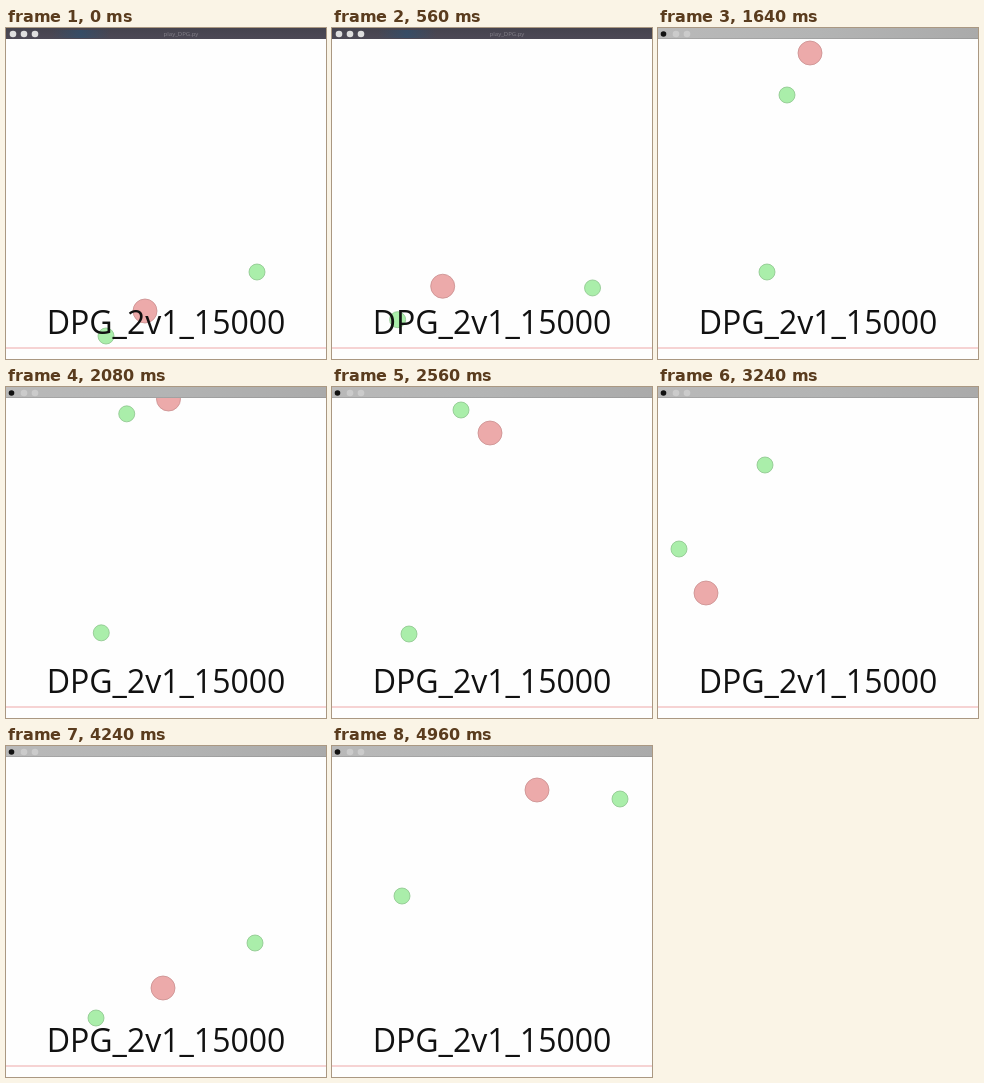
Recreate the animation shown at these times as an HTML page with a canvas. Size 320x331 px, loop 5 s.

```html
<!DOCTYPE html>
<html lang="en">
<head>
<meta charset="utf-8">
<title>DPG 2v1</title>
<style>
  html, body { margin: 0; width: 100%; height: 100%; overflow: hidden; background: #fefefe; }
  canvas { display: block; width: 320px; height: 331px; }
</style>
</head>
<body>
<canvas id="stage" width="320" height="331"></canvas>
<script>
const ctx = document.getElementById('stage').getContext('2d');
const LOOP = 5000;
const STEP = 40;
const BAR_SWITCH = 800;
const BAR_HEIGHT = 11;

// Each path point: [time in ms, x, y]
const agents = [
  { radius: 12, fill: '#ecaaaa', edge: '#c98f8f', path: [
    [0, 139, 283], [480, 108, 262], [1040, 151, 221], [1640, 152, 25], [2560, 158, 46],
    [3240, 48, 206], [4240, 157, 242], [4960, 205, 44]] },
  { radius: 8, fill: '#aaeeaa', edge: '#8cc58c', path: [
    [0, 100, 308], [400, 50, 286], [1040, 138, 313], [1640, 109, 244], [2560, 77, 247],
    [3240, 21, 162], [4240, 90, 272], [4960, 70, 150]] },
  { radius: 8, fill: '#aaeeaa', edge: '#8cc58c', path: [
    [0, 251, 244], [500, 260, 258], [1040, 253, 262], [1640, 129, 67], [2560, 129, 23],
    [3240, 107, 78], [4240, 249, 197], [4960, 288, 53]] }
];

const clamp = (v, lo, hi) => Math.min(hi, Math.max(lo, v));

function slope(path, i, axis) {
  const a = path[Math.max(0, i - 1)];
  const b = path[Math.min(path.length - 1, i + 1)];
  return (b[axis] - a[axis]) / (b[0] - a[0]);
}

// Cubic Hermite curve through unevenly timed points
function position(path, time, axis) {
  const t = Math.min(time, path[path.length - 1][0]);
  let i = 0;
  while (i < path.length - 2 && t > path[i + 1][0]) i++;
  const a = path[i], b = path[i + 1];
  const span = b[0] - a[0];
  const u = (t - a[0]) / span;
  const u2 = u * u, u3 = u2 * u;
  return (2 * u3 - 3 * u2 + 1) * a[axis] + (3 * u2 - 2 * u3) * b[axis] +
    (u3 - 2 * u2 + u) * span * slope(path, i, axis) +
    (u3 - u2) * span * slope(path, i + 1, axis);
}

function disc(x, y, radius, fill, edge) {
  ctx.beginPath();
  ctx.arc(x, y, radius, 0, Math.PI * 2);
  ctx.fillStyle = fill;
  ctx.fill();
  if (edge) {
    ctx.strokeStyle = edge;
    ctx.lineWidth = 0.8;
    ctx.stroke();
  }
}

function label(text, x, y, size, color) {
  ctx.font = `${size}px "Open Sans", "Noto Sans", sans-serif`;
  ctx.textAlign = 'center';
  ctx.textBaseline = 'alphabetic';
  ctx.fillStyle = color;
  ctx.fillText(text, x, y);
}

function bar(stops, horizontal) {
  const g = ctx.createLinearGradient(0, 0, horizontal ? 320 : 0, horizontal ? 0 : BAR_HEIGHT);
  stops.forEach((color, i) => g.addColorStop(i / (stops.length - 1), color));
  ctx.fillStyle = g;
  ctx.fillRect(0, 0, 320, BAR_HEIGHT);
}

function windowBar() {
  bar(['#45434e', '#4c4955']);
  const glow = ctx.createLinearGradient(46, 0, 104, 0);
  glow.addColorStop(0, 'rgba(45,80,112,0)');
  glow.addColorStop(0.5, 'rgba(45,80,112,.65)');
  glow.addColorStop(1, 'rgba(45,80,112,0)');
  ctx.fillStyle = glow;
  ctx.fillRect(46, 2, 58, 8);
  for (const x of [7, 18, 29]) disc(x, 6, 3.3, '#dedede');
  label('play_DPG.py', 175, 8, 6, '#85828b');
}

function menuBar() {
  bar(['#b9b9b9', '#b3b4b4', '#aaaaaa'], true);
  ctx.fillStyle = 'rgba(110,110,110,.25)';
  ctx.fillRect(0, BAR_HEIGHT - 1, 320, 1);
  for (const x of [18, 29]) disc(x, 6, 3.3, '#cbcbcb');
  disc(5.5, 6, 2.8, '#111');
}

function draw(time) {
  ctx.fillStyle = '#fefefe';
  ctx.fillRect(0, 0, 320, 331);
  ctx.fillStyle = '#efa9a9';
  ctx.fillRect(0, 319.5, 320, 1);

  for (const { radius, fill, edge, path } of agents) {
    const x = clamp(position(path, time, 1), radius, 320 - radius);
    const y = clamp(position(path, time, 2), radius, 331 - radius);
    disc(x, y, radius, fill, edge);
  }

  label('DPG_2v1_15000', 160, 305.5, 32, '#111');
  if (time < BAR_SWITCH) windowBar();
  else menuBar();
}

const start = performance.now();
function frame() {
  const elapsed = (performance.now() - start) % LOOP;
  draw(Math.floor(elapsed / STEP) * STEP);
  requestAnimationFrame(frame);
}
frame();
</script>
</body>
</html>
```
